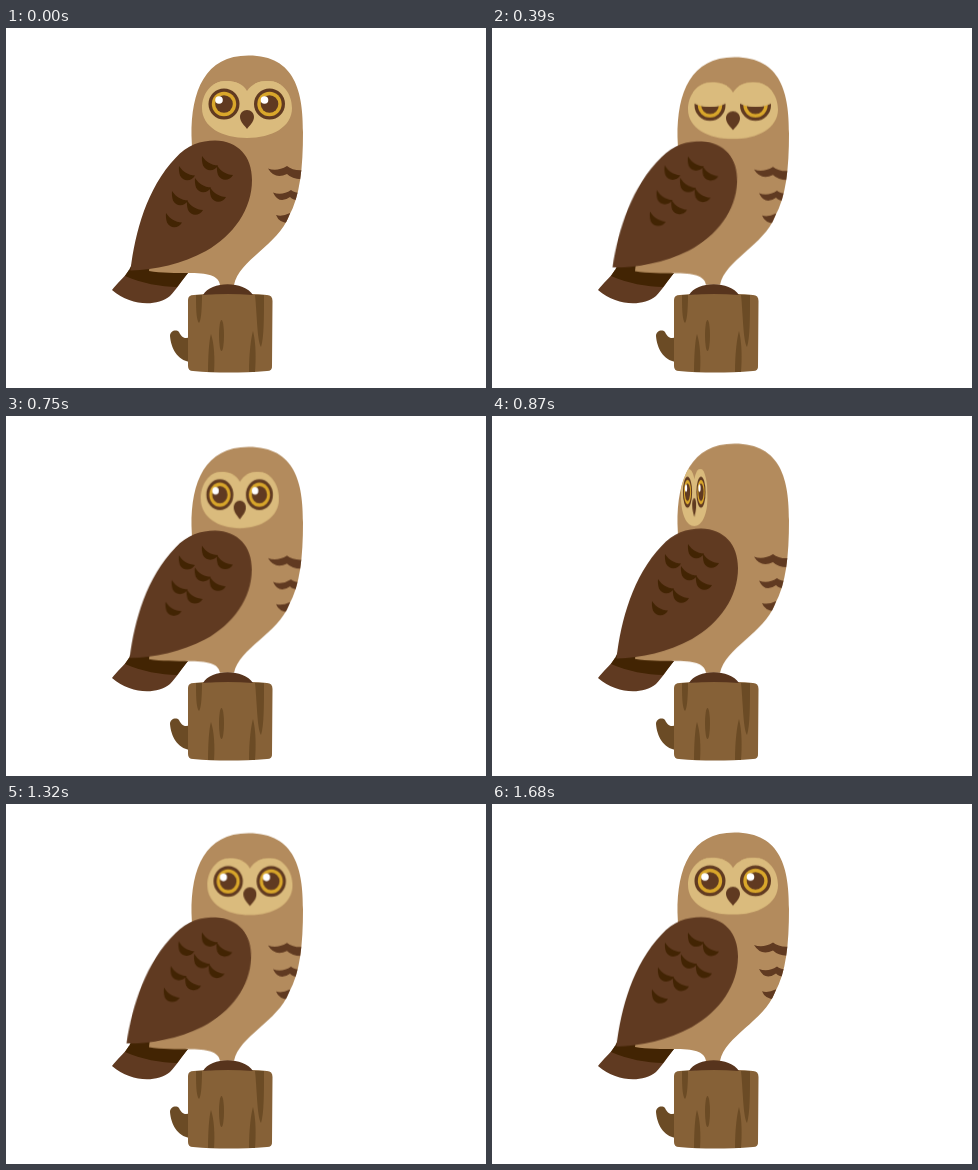
Recreate the animation shown at these times as an HTML page. Size 480 by 360 pixels, loop 1.71 s.

```html
<!DOCTYPE html>
<html lang="en">
<head>
<meta charset="utf-8">
<title>Owl</title>
<style>
  html, body { margin: 0; width: 100%; height: 100%; overflow: hidden; background: #fff; }
  svg { display: block; width: 480px; height: 360px; }

  .brown { fill: #603a21; }
  .dark { fill: #422403; }
  .tan { fill: #b38b5d; }
  .cream { fill: #dabb7d; }
  .gold { fill: #d9a72b; }
  .wood { fill: #866137; }
  .grain { fill: #6b4b25; }

  /* Breathing and wing share a half-loop rhythm */
  .bird { transform-origin: 241px 257px; animation: breathe 855ms infinite; }
  .wing { transform-origin: 215px 150px; animation: lift 855ms ease-in-out infinite; }
  .face { transform-origin: 241px 80px; animation: turn 1710ms infinite; }
  .lids { animation: blink 1710ms ease-in-out infinite; }

  @keyframes breathe {
    0%, 100% { transform: scaleY(1); animation-timing-function: ease-in-out; }
    12.3%, 87.7% { transform: scaleY(.985); animation-timing-function: linear; }
    17.5%, 82.5% { transform: scaleY(.9885); animation-timing-function: linear; }
    26.3%, 73.7% { transform: scaleY(.9915); animation-timing-function: linear; }
    50% { transform: scaleY(.993); animation-timing-function: linear; }
  }
  @keyframes lift {
    0%, 100% { transform: translateX(0) rotate(0deg); }
    14%, 86% { transform: translateX(-.2px) rotate(.4deg); }
    26%, 74% { transform: translateX(-.3px) rotate(.6deg); }
    45%, 55% { transform: translateX(-.8px) rotate(2deg); }
  }
  /* Leaves at the left edge, comes round again from the right */
  @keyframes turn {
    0%, 38.6% {
      transform: translateX(0) scaleX(1);
      animation-timing-function: cubic-bezier(.333, 0, .667, .333);
    }
    53.3% { transform: translateX(-55px) scaleX(0); }
    64.8% {
      transform: translateX(55px) scaleX(0);
      animation-timing-function: cubic-bezier(.333, .667, .667, 1);
    }
    81%, 100% { transform: translateX(0) scaleX(1); }
  }
  @keyframes blink {
    0%, 16%, 31%, 100% { transform: translateY(-19px); }
    21.5%, 26% { transform: translateY(0); }
  }
</style>
</head>
<body>
<svg viewBox="0 0 480 360">
  <defs>
    <path id="body" d="M185.500 108C185 63 199 27.500 242.500 27.500C290 27.500 297 65 297 104C297 140 294 168 283 188C272 217 233 232 228 257H214C213 249 205 245 185 245C170 245 155 245 143 243L150 180L186 120Z"/>
    <path id="mask" d="M241 63C246 55 255 52.500 262 53C277 53 286 66 286 80C286 99 266 110 241 110C216 110 196 99 196 80C196 66 205 53 220 53C227 53 237 55 241 63Z"/>
    <clipPath id="inBody"><use href="#body"/></clipPath>
    <clipPath id="inMask"><use href="#mask"/></clipPath>
    <path id="swoop" d="M0 0C4 6 9 9 16 9.500C13 15.500 4 16 1 9.500C0 6-.3 3 0 0Z"/>
    <g id="pair">
      <use href="#swoop"/>
      <use href="#swoop" x="15" y="9.500"/>
    </g>
    <g id="eye">
      <circle class="brown" r="15.500"/>
      <circle class="gold" r="12.200"/>
      <circle class="brown" r="8.800"/>
      <circle cx="-5" cy="-4" r="3.800" fill="#fff"/>
    </g>
    <path id="lid" d="M-17-36H17V-2.500Q0 6.500-17-2.500Z"/>
  </defs>

  <!-- Tail -->
  <path class="brown" d="M123 242L182 245C176 252 170 262 164 268C150 279 125 278 106 262C112 254 118 250 123 242Z"/>
  <path class="dark" d="M123 242L126 236L150 234L182 245L171 259C155 259 135 255 119 248Z"/>

  <!-- Stump -->
  <path class="grain" d="M184 309C178 312 175 308 173 304C170 301 164 303 164 308C165 320 171 332 184 334Z"/>
  <path class="wood" d="M182 272Q182 267 188 267C210 265 240 265 261 267Q266.500 267 266.500 273L266 338Q266.500 343 261 343C235 345 210 345 187 343Q182 343 182 338Z"/>
  <g class="grain">
    <path d="M190 267H196C196 280 195 293 193 295C190 292 190 278 190 267Z"/>
    <path d="M202 344C202 330 203 312 205 306C208 315 209 330 208 344Z"/>
    <ellipse cx="215.500" cy="307.500" rx="2.500" ry="15.500"/>
    <path d="M243 344C243 325 245 310 247 303C250 315 250 330 249 344Z"/>
    <path d="M249 267H258C258 290 258 310 255 319C251 312 251 285 249 267Z"/>
  </g>

  <g class="bird">
    <use href="#body" class="tan"/>
    <g clip-path="url(#inBody)">
      <g class="brown">
        <path d="M262 140.500Q271 144 281 138Q287 143 298 142V151Q287 152 281 146Q269 152 262 140.500Z"/>
        <path d="M267 164.500Q276 168 285 162Q288 165 296 165V172Q288 173 284 169Q273 177 267 164.500Z"/>
        <path d="M270 187Q276 189 284 185L283 195Q273 195 270 187Z"/>
      </g>
      <g class="face">
        <use href="#mask" class="cream"/>
        <g clip-path="url(#inMask)">
          <use href="#eye" x="218" y="76"/>
          <use href="#eye" x="263.500" y="76"/>
          <g class="lids cream">
            <use href="#lid" x="218" y="76"/>
            <use href="#lid" x="263.500" y="76"/>
          </g>
        </g>
        <path class="brown" d="M234 89C234 85 237 82 241 82C245 82 248 85 248 89C248 94 243 98 241 101C239 98 234 94 234 89Z"/>
      </g>
    </g>
    <g class="wing">
      <path class="brown" d="M124.500 242.500C129 204 141 160 169.500 130C181 117 195 112.500 209 112.500C232 113 246 128 246 152C246 181 228 207 200 223C176 236 149 242 124.500 242.500Z"/>
      <g class="dark">
        <use href="#pair" x="196" y="128"/>
        <use href="#swoop" x="173" y="138"/>
        <use href="#pair" x="189" y="150"/>
        <use href="#pair" x="166" y="163"/>
        <use href="#swoop" x="160" y="185"/>
      </g>
    </g>
  </g>

  <!-- Foot mound -->
  <path fill="#57341d" d="M197 267C205 252.500 238 252.500 247 267Q222 265 197 267Z"/>
</svg>
</body>
</html>
```
